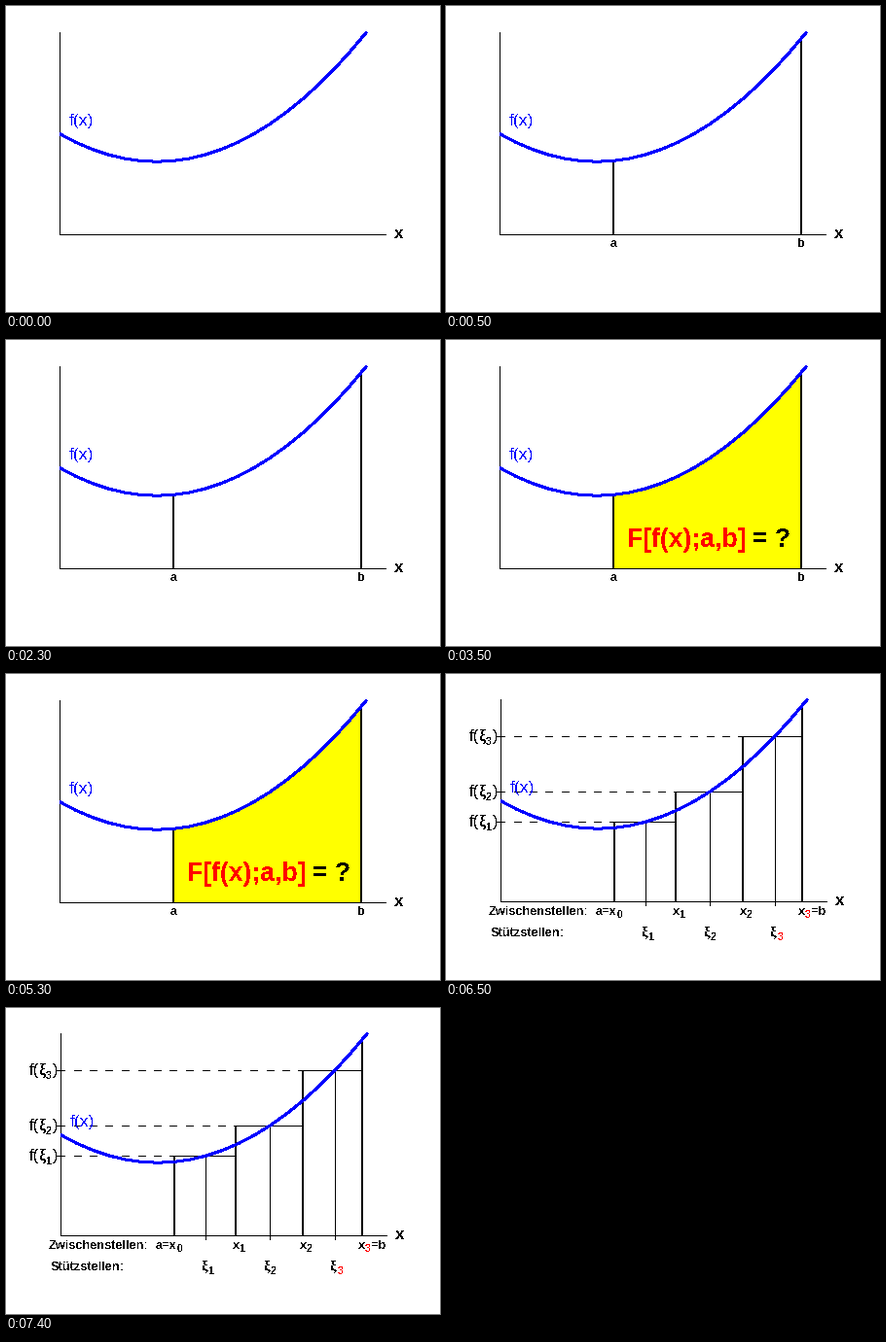
A matplotlib script for the animation above (8000 ms loop, 446x315 px).

```python
import numpy as np
import matplotlib.pyplot as plt
from matplotlib.animation import FuncAnimation
from matplotlib.patches import Polygon, Rectangle

W, H, DPI = 446, 315, 100
PT = 72 / DPI  # points per pixel
STEP_MS, STEPS = 500, 16
STARTS = (0, 1, 7, 13)  # step at which each scene appears

BLUE, RED, YELLOW = "#0000ff", "#ff0000", "#ffff00"
SANS, SERIF = "Liberation Sans", "Liberation Serif"

plt.rcParams["text.antialiased"] = False

fig = plt.figure(figsize=(W / DPI, H / DPI), dpi=DPI, facecolor="white")
ax = fig.add_axes([0, 0, 1, 1])
ax.set_xlim(0, W)
ax.set_ylim(H, 0)
ax.axis("off")


def bar(x, y, w, h):
    """Black line given as an exact block of pixels."""
    return ax.add_patch(Rectangle((x, y), w, h, fc="black", lw=0,
                                  antialiased=False, zorder=2))


def label(x, y, text, size, color="black", bold=True, font=SANS, ha="left"):
    return ax.text(x, y, text, fontsize=size * PT, color=color, family=font,
                   weight="bold" if bold else "normal", ha=ha,
                   va="baseline", zorder=4)


def curve_y(x):
    return 160.2 - 0.00287 * (x - 155) ** 2


def graph(dx=0, dy=0):
    """Axes, curve and their names."""
    x = np.linspace(55.5, 370.5, 20)
    line, = ax.plot(x + dx, curve_y(x) + dy, color=BLUE, lw=2 * PT,
                    antialiased=False, snap=False,
                    solid_capstyle="butt", zorder=3)
    return [
        line,
        bar(55 + dx, 27 + dy, 1, 209),
        bar(55 + dx, 235 + dy, 336, 1),
        label(65 + dx, 123 + dy, "f(x)", 17.5, BLUE, bold=False),
        label(399 + dx, 239 + dy, "x", 17),
    ]


def bounds():
    """Limits a and b of the interval."""
    return [
        bar(171, 160, 2, 75),
        bar(364, 33, 2, 202),
        label(172.5, 248, "a", 12.7, ha="center"),
        label(365.5, 248, "b", 12.7, ha="center"),
    ]


def area():
    x = np.linspace(172, 365, 40)
    points = [(172, 235), *zip(x, curve_y(x)), (365, 235)]
    fill = ax.add_patch(Polygon(points, fc=YELLOW, lw=0,
                                antialiased=False, zorder=1))
    return [
        fill,
        label(186, 213, "F[f(x);a,b]", 26.5, RED),
        label(315, 213, "= ?", 26.5),
    ]


def dashes(left, right, y, dash=8, period=16.5):
    return [bar(round(x), y, min(dash, right - round(x)), 1)
            for x in np.arange(left, right - 1, period)]


def xi(x, y, n, size=15, color="black"):
    return [
        label(x, y, "ξ", size, font=SERIF),
        label(x + 7, y + 4, n, 10.5, color),
    ]


def steps():
    """Rectangle sums with nodes x_i and intermediate points xi_i."""
    edges, mids, tops = (173, 236, 305, 366), (205, 271, 338), (152, 121, 64)
    parts = [bar(172, 152, 2, 82), bar(365, 32, 2, 202)]
    for i, (mid, top) in enumerate(zip(mids, tops)):
        left, right = edges[i], edges[i + 1]
        n = str(i + 1)
        parts += [bar(left, top, right - left, 1),
                  bar(mid, top, 1, 239 - top)]
        if i:
            parts.append(bar(left - 1, top, 2, 234 - top))
        parts += dashes(53, left, top)

        base = top + 5
        parts += [label(24, base, "f(", 16.5, bold=False),
                  label(48, base, ")", 16.5, bold=False)]
        parts += xi(34, base, n, 16)

        accent = RED if i == 2 else "black"
        name_x = (233, 302, 362)[i]
        parts += [label(name_x, 248, "x", 12.7),
                  label(name_x + 7, 251, n, 10.5, accent)]
        parts += xi((201, 265, 334)[i], 270, n, color=accent)

    return parts + [
        label(44, 248, "Zwischenstellen:", 12.7),
        label(154, 248, "a=x", 12.7),
        label(176, 251, "0", 10.5),
        label(375, 248, "=b", 12.7),
        label(46, 270, "Stützstellen:", 12.7),
    ]


plain, limits = graph(), bounds()
scenes = [plain, plain + limits, plain + limits + area(), graph(1, -1) + steps()]
artists = {part for scene in scenes for part in scene}


def update(step):
    current = sum(step >= start for start in STARTS) - 1
    for part in artists:
        part.set_visible(False)
    for part in scenes[current]:
        part.set_visible(True)
    return list(artists)


anim = FuncAnimation(fig, update, frames=STEPS, interval=STEP_MS,
                     repeat=True, repeat_delay=0, blit=False)
plt.show()
```
